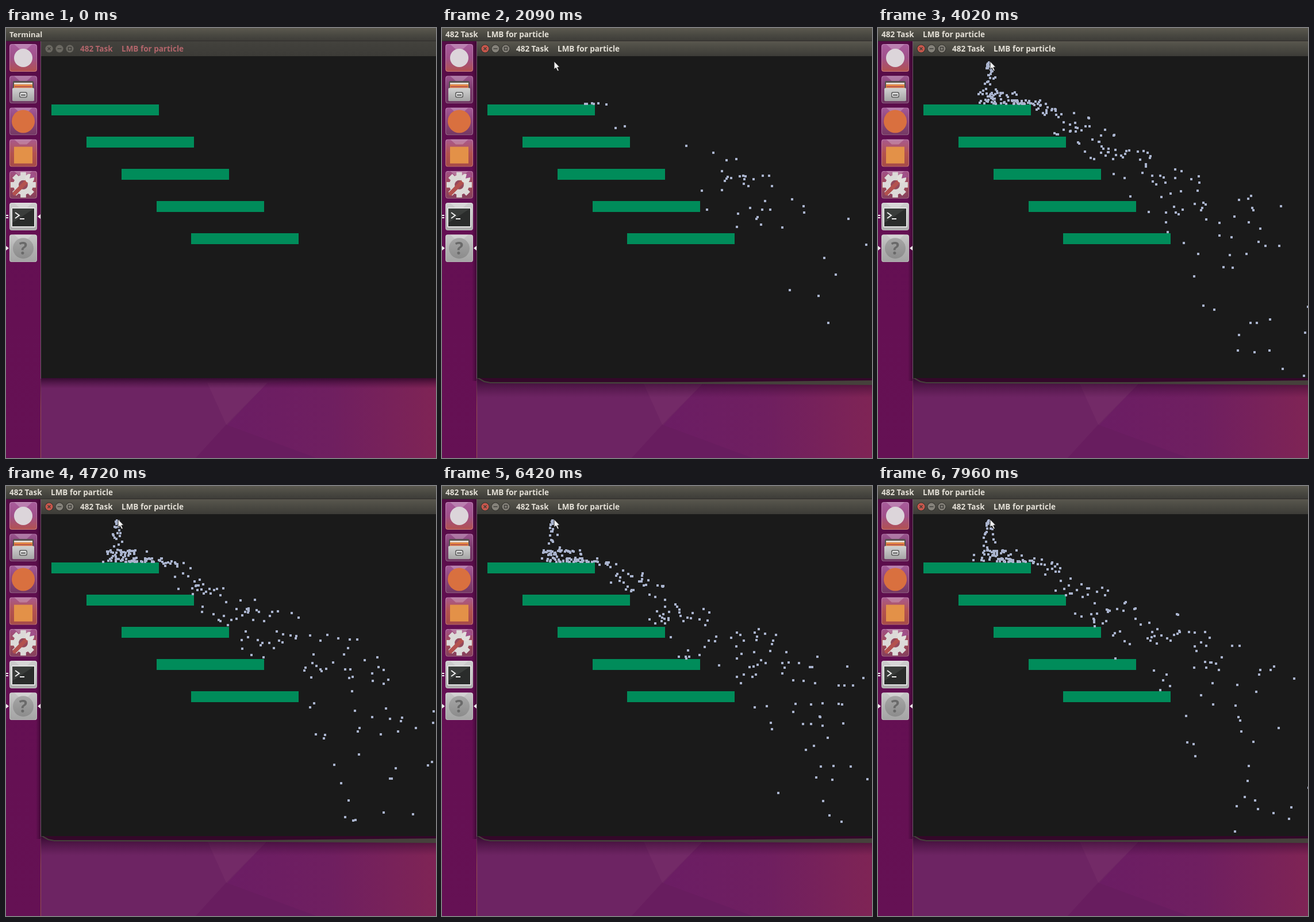
An HTML page with a canvas for the animation above (8 s loop, 748 by 748 pixels).

```html
<!DOCTYPE html>
<html lang="en">
<head>
<meta charset="utf-8">
<title>Particle stairs</title>
<style>
html, body { margin: 0; width: 100%; height: 100%; overflow: hidden; background: #1a1a1a; }
canvas { display: block; }
</style>
</head>
<body>
<canvas id="stage" width="748" height="748"></canvas>
<script>
const ctx = document.getElementById('stage').getContext('2d');
const SIZE = 748, LOOP = 8000, STEPS_PER_MS = 0.21;
const FONT = '"Open Sans", "Noto Sans", sans-serif';
const FOCUS_AT = 610;

// Spans of screen updates: first time, last time, number of updates
const UPDATES = [
  [0, 0, 1], [570, 1350, 18], [1400, 2190, 17], [2360, 2760, 9], [3030, 3030, 1],
  [3330, 4120, 17], [4170, 4970, 17], [5020, 5720, 14], [5920, 6680, 15],
  [6730, 7520, 15], [7570, 7670, 3], [7810, 7960, 4]
];
const BURSTS = [[760, 850], [940, 1090], [1440, 1480], [2145, LOOP]];
const POINTER = [[570, 330, 420], [740, 195, 58], [1500, 195, 58], [1700, 72, 110], [2040, 195, 58]];
const steps = Array.from({ length: 5 }, (_, i) => ({
  x: Math.floor(79.5 + 60.85 * i), y: 133 + 56 * i, w: 187, h: 19
}));

// ---- drawing helpers ----
function rect(x, y, w, h, fill) {
  ctx.fillStyle = fill;
  ctx.fillRect(x, y, w, h);
}
function disc(x, y, r, fill) {
  ctx.fillStyle = fill;
  ctx.beginPath();
  ctx.arc(x, y, r, 0, 7);
  ctx.fill();
}
function poly(points, fill, stroke) {
  ctx.beginPath();
  for (let i = 0; i < points.length; i += 2) ctx.lineTo(points[i], points[i + 1]);
  ctx.closePath();
  ctx.fillStyle = fill;
  ctx.fill();
  if (stroke) {
    ctx.strokeStyle = stroke;
    ctx.lineWidth = 1;
    ctx.stroke();
  }
}
function rounded(x, y, w, h, r, fill) {
  ctx.beginPath();
  ctx.roundRect(x, y, w, h, r);
  ctx.fillStyle = fill;
  ctx.fill();
}
function gradient(x0, y0, x1, y1, ...colors) {
  const g = ctx.createLinearGradient(x0, y0, x1, y1);
  colors.forEach((c, i) => g.addColorStop(i / (colors.length - 1), c));
  return g;
}
function label(text, x, y, color, size = 13.5) {
  ctx.font = `bold ${size}px ${FONT}`;
  ctx.fillStyle = color;
  ctx.fillText(text, x, y);
}
function titleText(x, y, color) {
  label('482 Task', x, y, color);
  label('LMB for particle', x + 72, y, color);
}

// ---- launcher icons, drawn in a 48 px tile ----
function gear(x, y, r, fill) {
  disc(x, y, r * 0.78, fill);
  for (let i = 0; i < 8; i++) {
    ctx.save();
    ctx.translate(x, y);
    ctx.rotate(i * Math.PI / 4);
    rect(-r * 0.22, -r, r * 0.44, r, fill);
    ctx.restore();
  }
}
const icons = [
  { tile: ['#a85c9c', '#a0508a', '#b3524f'], draw: () => disc(24, 24, 16, '#dcd5da') },
  { tile: ['#9c5590', '#7a3a6c', '#6d3460'], draw() {
    rounded(6, 9, 36, 24, 2, '#55504e');
    rect(8, 12, 32, 3, '#e8e0d8');
    rect(8, 15, 32, 7, '#e88a45');
    rect(9, 18, 30, 2, '#b3524f');
    rounded(5, 21, 38, 23, 2, gradient(0, 21, 0, 44, '#d2d2d2', '#a5a5a5'));
    rounded(17, 28, 14, 10, 3, '#5c5c5c');
    rounded(18.5, 29.5, 11, 7, 2, '#e6e6e6');
    rect(20, 32, 8, 3, '#777');
  } },
  { tile: ['#a45a98', '#8c4479', '#733863'], draw: () => disc(24, 24, 20, '#d9703f') },
  { tile: ['#a85a90', '#b3524f', '#a64a48'], draw: () => rect(8, 13, 32, 29, '#e39148') },
  { tile: ['#a0508a', '#a04a55', '#84405f'], draw() {
    gear(24, 24, 22, '#dcdad8');
    disc(24, 24, 8, '#94495b');
    ctx.lineCap = 'round';
    ctx.lineWidth = 7;
    ctx.strokeStyle = '#b3524f';
    ctx.beginPath();
    ctx.moveTo(9, 39);
    ctx.lineTo(32, 16);
    ctx.stroke();
    disc(35, 13, 8, '#e2dfdc');
    poly([35, 13, 38, 1, 48, 10], '#a0508a');
  } },
  { tile: ['#cfcfcf', '#b9b9b9', '#aaaaaa'], draw() {
    rounded(3, 8, 42, 35, 2, '#e2e2e2');
    rect(5, 10, 38, 31, '#2a2c2b');
    poly([5, 10, 43, 10, 5, 35], '#3a3d3b');
    ctx.lineWidth = 2;
    ctx.lineCap = 'butt';
    ctx.strokeStyle = '#eee';
    ctx.beginPath();
    ctx.moveTo(10, 17);
    ctx.lineTo(17, 22);
    ctx.lineTo(10, 27);
    ctx.moveTo(18, 28);
    ctx.lineTo(26, 28);
    ctx.stroke();
  } },
  { tile: ['#c8c8c8', '#b2b2b2', '#a4a4a4'], draw() {
    disc(24, 24, 18, gradient(0, 6, 0, 42, '#a6a6a6', '#8c8c8c'));
    ctx.textAlign = 'center';
    label('?', 24, 35, '#6a6a6a', 30);
    ctx.textAlign = 'left';
  } }
];
function drawIcon(icon, i) {
  ctx.save();
  ctx.translate(6, 28 + 55.2 * i);
  ctx.beginPath();
  ctx.roundRect(0, 0, 48, 48, 4);
  ctx.clip();
  rect(0, 0, 48, 48, gradient(0, 0, 0, 48, ...icon.tile));
  poly([8, 0, 40, 0, 30, 9, 18, 9], 'rgba(255,255,255,.22)');
  icon.draw();
  ctx.beginPath();
  ctx.roundRect(0.5, 0.5, 47, 47, 4);
  ctx.strokeStyle = 'rgba(255,255,255,.25)';
  ctx.lineWidth = 1;
  ctx.stroke();
  ctx.restore();
}

// ---- scene ----
function drawDesktop(focused) {
  rect(60, 600, 688, 148, '#6d2463');
  poly([455, 617, 748, 600, 748, 748, 330, 748], gradient(383, 0, SIZE, 0, '#6b1d64', '#6f1f60', '#7f2455'));
  poly([350, 617, 455, 617, 383, 690], '#732a67');
  poly([330, 748, 383, 690, 540, 748], '#681d5f');
  const depth = focused ? 34 : 18;
  rect(60, 609, 688, depth, gradient(0, 609, 0, 609 + depth, 'rgba(35,3,32,.75)', 'rgba(60,10,50,0)'));
  if (focused) {
    poly([61, 609, 748, 609, 748, 621, 440, 619, 84, 618, 73, 616, 66, 612], '#45413b');
    poly([65, 609, 748, 609, 748, 613, 440, 616, 84, 616, 74, 614], '#330829');
  }
}
function drawLauncher(focused) {
  rect(0, 23, 60, 725, gradient(0, 23, 0, 748, '#540c45', '#640f53', '#651053', '#651154'));
  if (focused) rect(52, 24, 8, 590, gradient(52, 0, 60, 0, 'rgba(50,5,42,0)', 'rgba(50,5,42,.65)'));
  rect(60, 23, 1, 587, '#70566a');
  rect(60, 610, 1, 138, gradient(0, 610, 0, 660, '#5a2a50', '#94504f'));
  icons.forEach(drawIcon);
  rect(0, 325, 4, 2, '#eee');
  rect(0, 329, 4, 2, '#eee');
  poly([0, 379, 5, 383, 0, 387], '#eee');
  const y = focused ? 383 : 328;
  poly([60, y - 4, 55, y, 60, y + 4], '#eee');
}
function drawButtons(focused) {
  const rim = focused ? '#34332f' : '#45443f';
  [75, 93, 111].forEach((x, i) => {
    disc(x, 36, 7.5, rim);
    disc(x, 36, 6.5, focused ? (i ? '#85827a' : '#c8574c') : '#6b6962');
    ctx.strokeStyle = '#3c3b37';
    ctx.lineWidth = 1.4;
    ctx.beginPath();
    if (i === 0) {
      ctx.moveTo(x - 2.5, 33.5); ctx.lineTo(x + 2.5, 38.5);
      ctx.moveTo(x + 2.5, 33.5); ctx.lineTo(x - 2.5, 38.5);
    } else if (i === 1) {
      ctx.moveTo(x - 3.5, 36); ctx.lineTo(x + 3.5, 36);
    } else {
      ctx.rect(x - 2.5, 33.5, 5, 5);
    }
    ctx.stroke();
  });
}
function drawBars(focused) {
  rect(0, 0, SIZE, 23, gradient(0, 0, 0, 23, '#5b594f', '#4a4942', '#3c3b37'));
  rect(0, 22, SIZE, 1, '#302c2b');
  rect(61, 23, 687, 26, focused
    ? gradient(0, 23, 0, 49, '#59574e', '#4a4942', '#3c3b37')
    : gradient(0, 23, 0, 49, '#43423d', '#3c3b37'));
  drawButtons(focused);
  titleText(129, 41, focused ? '#e3dfd6' : '#b2656b');
  if (focused) titleText(6, 16, '#e3dfd6');
  else label('Terminal', 6, 16, '#e3dfd6', 13);
}
function pointerAt(t) {
  let i = 0;
  while (i < POINTER.length - 2 && t > POINTER[i + 1][0]) i++;
  const [t0, x0, y0] = POINTER[i], [t1, x1, y1] = POINTER[i + 1];
  const k = Math.min(1, Math.max(0, (t - t0) / (t1 - t0)));
  const e = k * k * (3 - 2 * k);
  return [x0 + (x1 - x0) * e, y0 + (y1 - y0) * e];
}
function drawPointer(t) {
  if (t < POINTER[0][0]) return;
  ctx.save();
  ctx.translate(...pointerAt(t));
  poly([0, 0, 0, 14, 3.2, 11.2, 6, 17, 8.4, 16, 5.8, 10.4, 9.6, 10], '#f4f4f4', '#222');
  ctx.restore();
}

// ---- particles ----
const GRAVITY = 0.0935, SPREAD = 0.82, KICK = 1.15, BOUNCE = 0.5;
let particles, tick, seed;

function random() {
  seed = (seed * 1664525 + 1013904223) >>> 0;
  return seed / 4294967296;
}
function reset() {
  particles = [];
  tick = 0;
  seed = 335;
}
function advance() {
  const t = tick++ / STEPS_PER_MS;
  if (BURSTS.some(([from, to]) => t >= from && t < to) && random() < 0.88) {
    particles.push({
      x: 193.5, y: 60,
      vx: (random() - 0.5) * SPREAD,
      vy: (random() - 0.5) * 0.4
    });
  }
  for (const p of particles) {
    p.x += p.vx;
    p.y += p.vy;
    p.vy += GRAVITY;
    for (const s of steps) {
      if (p.x > s.x && p.x < s.x + s.w && p.y > s.y - 1 && p.y < s.y + s.h) {
        p.y = s.y - 1;
        p.vy *= -BOUNCE;
        p.vx += random() * KICK;
      }
    }
  }
  particles = particles.filter(p => p.y < 607 && p.x < 760);
}
function simulate(t) {
  const goal = Math.round(t * STEPS_PER_MS);
  if (!particles || goal < tick) reset();
  while (tick < goal) advance();
}

// ---- playback ----
function shownTime(t) {
  const [from, to, count] = UPDATES.filter(u => u[0] <= t).pop();
  if (count === 1) return from;
  const gap = (to - from) / (count - 1);
  return from + gap * Math.min(count - 1, Math.floor((t - from) / gap + 1e-6));
}
function draw(now) {
  const t = shownTime(now % LOOP);
  const focused = t >= FOCUS_AT;
  simulate(t);
  drawDesktop(focused);
  drawLauncher(focused);
  drawBars(focused);
  rect(61, 49, 687, 560, '#1a1a1a');
  for (const s of steps) rect(s.x, s.y, s.w, s.h, '#008c5a');
  for (const p of particles) rect(Math.round(p.x) - 2, Math.round(p.y) - 2, 4, 4, '#a9b3cd');
  drawPointer(t);
}
const start = performance.now();
function loop() {
  draw(performance.now() - start);
  requestAnimationFrame(loop);
}
loop();
</script>
</body>
</html>
```
